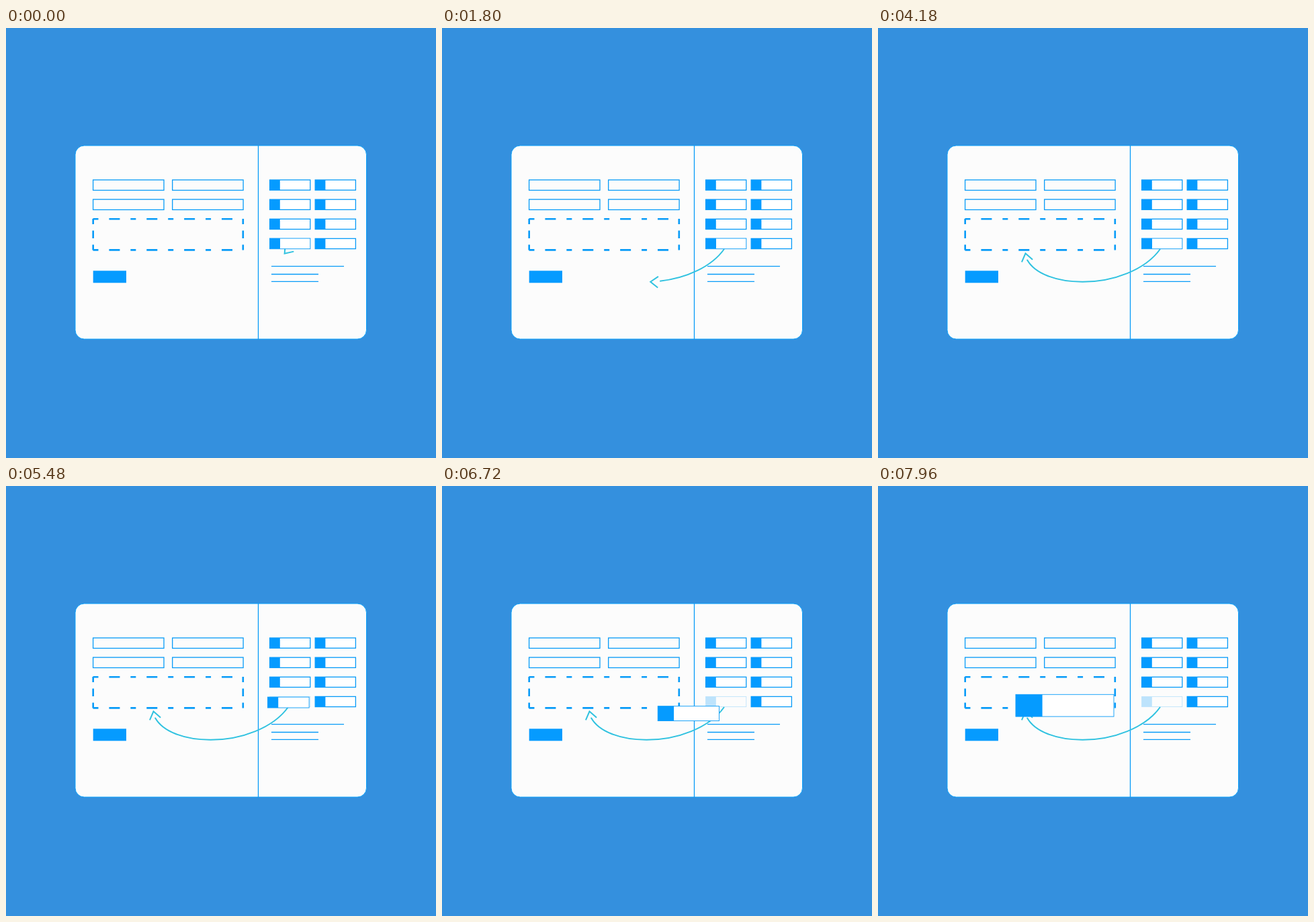
Write an HTML page that moves like this. It is 640 px wide and 640 px high and loops after 8 s.

```html
<!DOCTYPE html>
<html lang="en">
<head>
<meta charset="utf-8">
<title>Drag and drop form</title>
<style>
  html, body { margin: 0; width: 100%; height: 100%; overflow: hidden; background: #3490de; }
  svg { display: block; width: 100vw; height: 100vh; }
</style>
</head>
<body>
<svg viewBox="0 0 640 640" fill="none" stroke="#079bf8" stroke-width="1.3">
  <rect x="103" y="175" width="433.5" height="288" rx="13.5" fill="#fcfcfc" stroke="#0a9ffa" stroke-width="1"/>
  <path d="M375.5 175V463"/>
  <g id="fields"></g>
  <g stroke-width="2.6">
    <path d="M129.5 284.2H353M129.5 330.4H353" stroke-dasharray="8 15.93 16 15.93" id="across"/>
    <path d="M129.7 284V330.5M352.8 284V330.5" stroke-dasharray="8 9.5 11.5 9.5 8 0"/>
  </g>
  <rect x="129.7" y="361.3" width="49.3" height="18" fill="#059bff" stroke="none"/>
  <path d="M395 354.7H503M395 366.5H465M395 377.4H465"/>
  <g id="tiles"></g>
  <g stroke="#30c2e0" stroke-width="2">
    <path id="trail" d="M420 329C398 360 350 378 304 377.8C264 377.5 233 365 222 345L219.5 335.5"/>
    <path id="head" d="M11.3-8.3L0 0L11.3 8.3"/>
  </g>
  <g id="dragged"></g>
</svg>
<script>
const LOOP = 8000, STEP = 112, DRAG_START = 5480;
const $ = id => document.getElementById(id);

const box = (x, y, w, h, attrs = '') =>
  `<rect x="${x}" y="${y}" width="${w}" height="${h}" ${attrs}/>`;

const tile = (x, y, w, h, square) =>
  box(x, y, w, h, 'fill="#fff"') + box(x, y, square, h, 'fill="#059bff" stroke="none"');

for (const y of [226.1, 255.1])
  for (const x of [129.6, 247.7]) $('fields').innerHTML += box(x, y, 105.4, 15.4);

for (let row = 0; row < 4; row++)
  for (const x of [392.6, 460.2]) {
    const ghost = row === 3 && x < 400;
    $('tiles').innerHTML +=
      `<g ${ghost ? 'opacity=".25" stroke-width=".9"' : ''}>${tile(x, 226.1 + row * 29.1, 60.2, 15.2, 15.2)}</g>`;
  }

// Smooth curve through rows of [step, value, value, ...]
function follow(keys, at) {
  const last = keys.length - 1;
  let i = 0;
  while (i < last - 1 && at > keys[i + 1][0]) i++;
  const a = keys[i], b = keys[i + 1], span = b[0] - a[0];
  const u = Math.min(1, (at - a[0]) / span);
  const slope = (k, c) => {
    const p = keys[Math.max(0, k - 1)], q = keys[Math.min(last, k + 1)];
    return (q[c] - p[c]) / (q[0] - p[0]);
  };
  return a.slice(1).map((v, n) => {
    const c = n + 1, w = 1 - u;
    return v * w * w * (1 + 2 * u) + b[c] * u * u * (3 - 2 * u)
      + span * u * w * (slope(i, c) * w - slope(i + 1, c) * u);
  });
}

const trail = $('trail'), total = trail.getTotalLength();

// step, distance of the tip, gap behind it, angle of the head
const arrowKeys = [
  [0, 8.6, 8.6, -49], [10, 103, 13, -8], [16, 124, 14, 2.5], [20, 131.5, 11.5, 4],
  [26, 146, 9, 7.5], [30, 166, 9, 17], [37, total, 9.8, 77],
];
// step, centre x, centre y, width
const dragKeys = [
  [0, 422.7, 320.9, 60.3], [6, 407, 328.3, 69.3], [10, 382.5, 336.5, 83],
  [17, 325, 341, 113.7], [20, 300, 335, 132], [23, 278, 326.7, 146],
];

function draw(t) {
  const arrowStep = Math.min(37, Math.floor((t - 8) / STEP));
  const [tip, gap, angle] = follow(arrowKeys, Math.max(0, arrowStep));
  const p = trail.getPointAtLength(tip);
  trail.setAttribute('stroke-dasharray', `${Math.max(0, tip - gap)} 999`);
  $('head').setAttribute('transform', `translate(${p.x} ${p.y}) rotate(${angle})`);

  const dragStep = Math.max(0, Math.floor((t - DRAG_START) / STEP) + 1);
  const [cx, cy, w] = follow(dragKeys, dragStep);
  const h = 3.6 + w * 0.2;
  $('dragged').innerHTML =
    `<g stroke-width=".9">${tile(cx - w / 2, cy - h / 2, w, h, w * (0.245 + w * 0.00018))}</g>`;
}

function tick() {
  draw(performance.now() % LOOP);
  requestAnimationFrame(tick);
}
tick();
</script>
</body>
</html>
```
